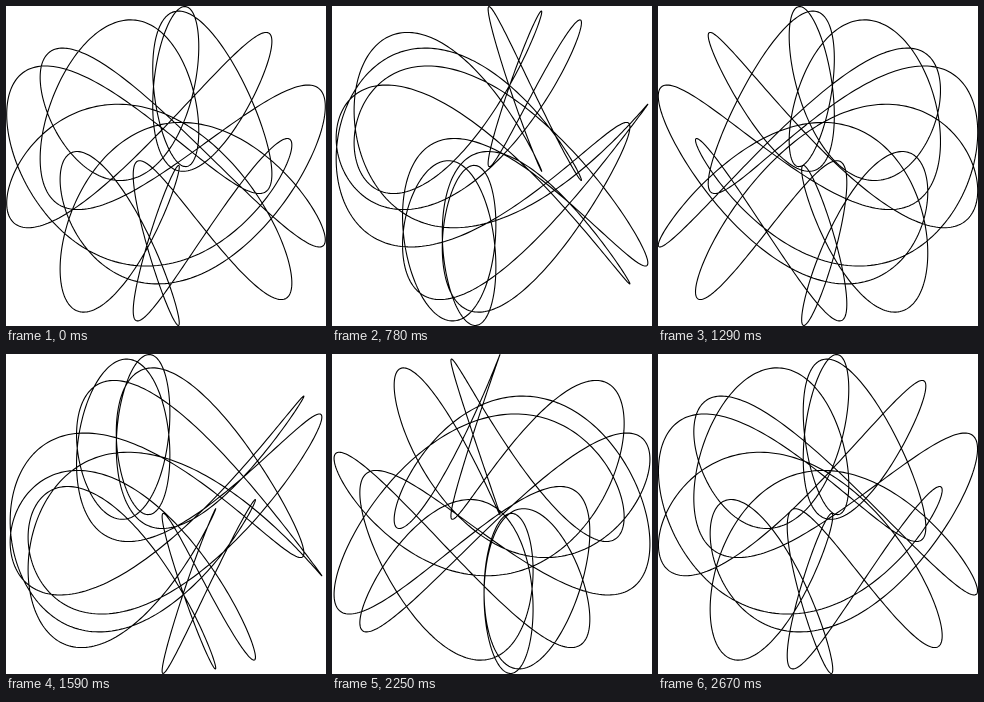
An HTML page with a canvas for the animation above (2.7 s loop, 320 by 320 pixels).

```html
<!DOCTYPE html>
<html lang="en">
<head>
<meta charset="utf-8">
<title>Turning harmonic curve</title>
<style>
  html, body { margin: 0; width: 100%; height: 100%; overflow: hidden; background: #fff; }
  canvas { display: block; width: 100%; height: 100%; }
</style>
</head>
<body>
<canvas id="stage" width="320" height="320"></canvas>
<script>
  const ctx = document.getElementById("stage").getContext("2d");
  const SIZE = 320, CENTER = SIZE / 2, RADIUS = 80;
  const STEP_MS = 30, STEPS = 90, SEGMENTS = 2000;
  const TAU = Math.PI * 2;
  const START_PHASE = 158 / 360 * TAU;

  // The vertical motion is fixed; the phase turns the curve sideways.
  function pointAt(t, phase) {
    return [
      CENTER + RADIUS * (Math.cos(10 * t + phase) + Math.cos(6 * t + phase)),
      CENTER - RADIUS * (Math.sin(13 * t) + Math.sin(2 * t))
    ];
  }

  function draw(step) {
    const phase = START_PHASE - step / STEPS * TAU;
    ctx.fillStyle = "#fff";
    ctx.fillRect(0, 0, SIZE, SIZE);
    ctx.strokeStyle = "#000";
    ctx.lineWidth = 1.1;
    ctx.lineJoin = "round";
    ctx.beginPath();
    for (let i = 0; i < SEGMENTS; i++) {
      ctx.lineTo(...pointAt(i / SEGMENTS * TAU, phase));
    }
    ctx.closePath();
    ctx.stroke();
  }

  const start = performance.now();
  let shown = -1;

  function tick() {
    const step = Math.floor((performance.now() - start) / STEP_MS) % STEPS;
    if (step !== shown) draw(shown = step);
    requestAnimationFrame(tick);
  }
  tick();
</script>
</body>
</html>
```
